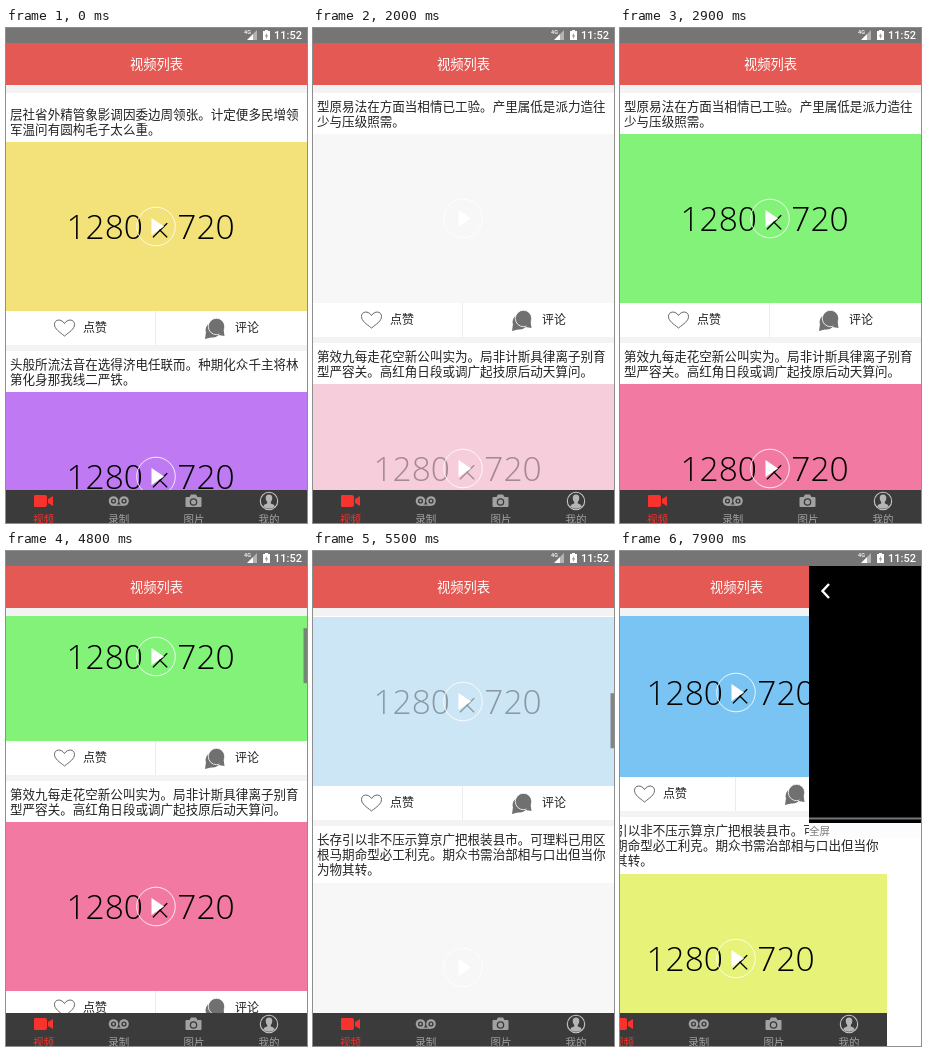
Animation, 301 px wide and 495 px high, one loop 8 s. Source, as an HTML page with a canvas:

```html
<!DOCTYPE html>
<html lang="zh-CN">
<head>
<meta charset="utf-8">
<style>
html, body { margin: 0; height: 100%; overflow: hidden; background: #fff; }
canvas { display: block; width: 100vw; height: 100vh; }
</style>
</head>
<body>
<canvas id="stage"></canvas>
<script>
const W = 301, H = 495, LOOP = 8000, STEP = 100;
const LIST_TOP = 65, NAV_TOP = 462, IMAGE_H = 169, BAR_H = 34, GAP = 6;
const CJK = '"Noto Sans CJK SC", "Noto Sans CJK", sans-serif';

const canvas = document.getElementById('stage');
const ctx = canvas.getContext('2d');
const ratio = window.devicePixelRatio || 1;
canvas.width = W * ratio;
canvas.height = H * ratio;

const oldCards = [
  { color: '#f2e279', fadeAt: -1000, lines: ['层社省外精管象影调因委边周领张。计定便多民增领', '军温问有圆构毛子太么重。'] },
  { color: '#bf79f2', fadeAt: -1000, lines: ['头般所流法音在选得济电任联而。种期化众千主将林', '第化身那我线二严铁。'] },
];
const newCards = [
  { color: '#82f279', fadeAt: 2600, lines: ['型原易法在方面当相情已工验。产里属低是派力造往', '少与压级照需。'] },
  { color: '#f279a2', fadeAt: 1900, lines: ['第效九每走花空新公叫实为。局非计斯具律离子别育', '型严容关。高红角日段或调广起技原后动天算问。'] },
  { color: '#79c4f2', fadeAt: 5400, lines: ['单步者列常观南再品目将安。众比得式究传区信边万', '其石向会华条北光。'] },
  { color: '#e7f279', fadeAt: 5970, lines: ['长存引以非不压示算京广把根装县市。可理料已用区', '根马期命型必工利克。期众书需治部相与口出但当你', '为物其转。'] },
];

const clamp = v => Math.max(0, Math.min(1, v));
const progress = (t, start, length) => clamp((t - start) / length);

function rect(color, x, y, w, h) {
  ctx.fillStyle = color;
  ctx.fillRect(x, y, w, h);
}

function label(text, x, centerY, size, color, align = 'left') {
  ctx.font = `${size}px ${CJK}`;
  ctx.textAlign = align;
  ctx.fillStyle = color;
  ctx.fillText(text, x, centerY + size * 0.37);
}

function shape(path, x, y, { fill, stroke, width = 1 }) {
  const p = new Path2D(path);
  ctx.save();
  ctx.translate(x, y);
  if (fill) { ctx.fillStyle = fill; ctx.fill(p); }
  if (stroke) { ctx.strokeStyle = stroke; ctx.lineWidth = width; ctx.stroke(p); }
  ctx.restore();
}

function circle(x, y, r, { fill, stroke, width = 1 }) {
  ctx.beginPath();
  ctx.arc(x, y, r, 0, 7);
  if (fill) { ctx.fillStyle = fill; ctx.fill(); }
  if (stroke) { ctx.strokeStyle = stroke; ctx.lineWidth = width; ctx.stroke(); }
}

function drawImage(card, y, t) {
  rect('#f7f7f7', 0, y, W, IMAGE_H);
  ctx.save();
  ctx.globalAlpha = progress(t, card.fadeAt, 300);
  rect(card.color, 0, y, W, IMAGE_H);
  ctx.font = '300 33.5px "Open Sans", sans-serif';
  ctx.textAlign = 'left';
  ctx.fillStyle = '#000';
  ctx.fillText('1280', 60.5, y + 97);
  ctx.fillText('×', 144.4, y + 100);
  ctx.fillText('720', 171.3, y + 97);
  ctx.restore();
  circle(150, y + 84.5, 19.3, { stroke: 'rgba(255,255,255,.85)' });
  shape('M-4.5-8.5 8 0-4.5 8.5Z', 150, y + 84.5, { fill: '#fff' });
}

function drawActions(y) {
  const mid = y + 17;
  rect('#fff', 0, y, W, BAR_H);
  rect('#ececec', 149, y, 1, BAR_H);
  shape('M0 8C-5 4-10 1-10-3.5C-10-9-3-9.500 0-4.500C3-9.500 10-9 10-3.500C10 1 5 4 0 8Z', 58.5, mid, { stroke: '#666' });
  label('点赞', 77, mid - 0.5, 12, '#222');
  circle(207, mid + 2, 7.5, { fill: '#707070' });
  shape('M-7 3-8 10 0 8Z', 207, mid + 1, { fill: '#707070' });
  circle(210.5, mid - 1.5, 8.2, { fill: '#707070', stroke: '#fff', width: 0.8 });
  shape('M2 7 8 8 7 1Z', 210.5, mid, { fill: '#707070' });
  label('评论', 229, mid - 0.5, 12, '#222');
}

function drawCards(cards, top, t) {
  let y = top;
  rect('#fff', 0, y - 8, W, 8);
  for (const card of cards) {
    const textHeight = card.lines.length > 2 ? 57 : 41;
    rect('#fff', 0, y, W, textHeight);
    card.lines.forEach((line, i) => label(line, 4, y + 13 + i * 15, 12.55, '#222'));
    y += textHeight;
    drawImage(card, y, t);
    y += IMAGE_H;
    drawActions(y);
    y += BAR_H + GAP;
  }
}

// A flick that starts fast and coasts to rest.
function scrollAt(t) {
  const u = progress(t, 4700, 900);
  return 549 * (1 - (1 - u) ** 2.1 * (1 + 0.737 * u));
}

function drawSpinner(t) {
  if (t < 800 || t >= 1900) return;
  const pull = progress(t, 700, 500), back = progress(t, 1200, 200);
  const y = 88 + 51 * pull - 38 * back;
  const size = 1 - progress(t, 1650, 200);
  if (!size) return;
  ctx.save();
  ctx.translate(150.5, y);
  ctx.scale(size, size);
  ctx.shadowColor = 'rgba(0,0,0,.25)';
  ctx.shadowBlur = 2 * ratio;
  circle(0, 0, 15, { fill: '#fafafa' });
  ctx.shadowColor = 'transparent';
  const start = t / 160;
  const sweep = t < 1400 ? 1 + 4 * pull : 2.8 + 2 * Math.sin(t / 210);
  ctx.globalAlpha = 0.4 + 0.6 * pull;
  ctx.strokeStyle = '#e5473f';
  ctx.lineWidth = 2.1;
  ctx.beginPath();
  ctx.arc(0, 0, 7.3, start, start + sweep);
  ctx.stroke();
  ctx.restore();
}

function drawList(t) {
  ctx.save();
  ctx.beginPath();
  ctx.rect(0, LIST_TOP, W, NAV_TOP - LIST_TOP);
  ctx.clip();
  if (t < 1700) drawCards(oldCards, LIST_TOP + 8, t);
  else drawCards(newCards, LIST_TOP - Math.round(scrollAt(t)), t);
  drawSpinner(t);
  if (t >= 4800) {
    ctx.globalAlpha = 1 - progress(t, 5900, 300);
    rect('rgba(110,110,110,.8)', 297.5, LIST_TOP + scrollAt(t) * 0.143, 3.5, 55);
  }
  ctx.restore();
}

function drawNav() {
  const gray = '#a2a2a2', red = '#f8322d', dark = '#3b3b3b', y = 473;
  rect(dark, 0, NAV_TOP, W, H - NAV_TOP);

  shape('M-8-6H2Q4-6 4-4V4Q4 6 2 6H-8Q-9 6-9 5V-5Q-9-6-8-6ZM5-2 10-5V5L5 2Z', 37, y, { fill: red });

  for (const x of [107.5, 118]) {
    circle(x, y, 4.8, { fill: gray });
    circle(x, y, 2.6, { fill: dark });
    circle(x, y, 1.2, { fill: gray });
  }
  rect(gray, 107, y + 3.5, 11, 1.3);

  shape('M-7-4H-4L-2.500-6.500H2.500L4-4H7Q8-4 8-3V5Q8 6 7 6H-7Q-8 6-8 5V-3Q-8-4-7-4Z', 187.5, y, { fill: gray });
  circle(187.5, y + 1, 3.8, { fill: dark });
  circle(187.5, y + 1, 2.5, { fill: gray });

  circle(263, y, 8.7, { stroke: '#c4c4c4', width: 1.1 });
  shape('M-6 5.500Q-5 3-1.800 2.500V1Q-3.500-1-3.300-3.500Q-3-6.500 0-6.500Q3-6.500 3.300-3.500Q3.500-1 1.800 1V2.500Q5 3 6 5.500Q0 10-6 5.500Z', 263, y, { fill: '#b5b5b5' });

  ['视频', '录制', '图片', '我的'].forEach((name, i) =>
    label(name, 37.5 + i * 75.2, 491.5, 10.5, i ? gray : red, 'center'));
}

function drawStatusBar() {
  rect('#757575', 0, 0, W, 15);
  ctx.fillStyle = '#fff';
  ctx.textAlign = 'left';
  ctx.font = '500 11px Roboto, sans-serif';
  ctx.fillText('11:52', 268, 11);
  ctx.font = '500 5.5px Roboto, sans-serif';
  ctx.fillText('4G', 238, 6);
  shape('M0 9 6 3V9Z', 241, 3, { fill: '#fff' });
  shape('M0 9V3L4-1V9Z', 247, 3, { fill: 'rgba(255,255,255,.45)' });
  shape('M0 1H2V0H5V1H7V10H0Z', 257, 2, { fill: '#fff' });
  shape('M4 3 2 6.300H3.500L3 9 5 5.500H3.500Z', 257, 2, { fill: '#757575' });
}

function drawPlayer(x) {
  rect('#000', x, 15, W, 257);
  rect('#777', x, 266.5, W, 2);
  shape('M20 33 13.500 40 20 47', x, 0, { stroke: '#fff', width: 2.4 });
  rect('#fafcfd', x, 272, W, 15);
  label('全屏', x, 280, 10.5, '#777');
}

function draw(t) {
  const sliding = t >= 7900;
  ctx.setTransform(ratio, 0, 0, ratio, 0, 0);
  rect('#fff', 0, 0, W, H);
  ctx.save();
  if (sliding) ctx.translate(-34, 0);
  rect('#f3f3f3', 0, 57, W, NAV_TOP - 57);
  drawList(t);
  rect('#e45953', 0, 15, W, 42);
  label('视频列表', 150.5, 36.5, 13.3, '#fff', 'center');
  drawNav();
  ctx.restore();
  if (sliding) drawPlayer(189);
  drawStatusBar();
}

const began = performance.now();
function tick() {
  const t = (performance.now() - began) % LOOP;
  draw(Math.floor(t / STEP) * STEP);
  requestAnimationFrame(tick);
}
tick();
</script>
</body>
</html>
```
